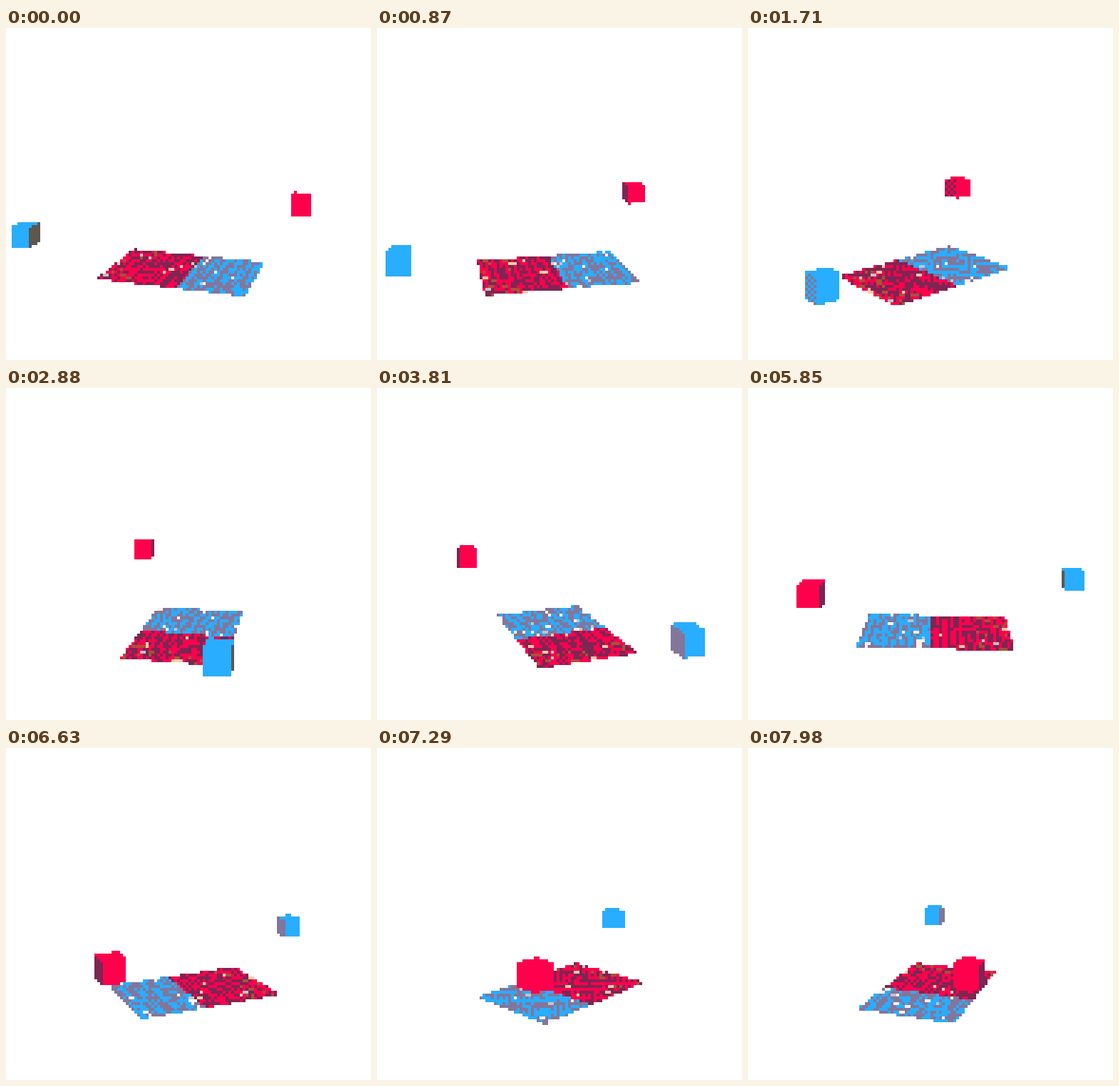
These frames come from a looping animation (512x465 px, 8 s). An HTML page with a canvas:

```html
<!DOCTYPE html>
<html lang="en">
<head>
<meta charset="utf-8">
<title>Orbiting cubes</title>
<style>
  html, body { margin: 0; width: 100%; height: 100%; overflow: hidden; background: #fff; }
  canvas { display: block; width: 512px; height: 468px; image-rendering: pixelated; }
</style>
</head>
<body>
<canvas id="stage" width="128" height="117"></canvas>
<script>
const ctx = document.getElementById('stage').getContext('2d');
const LOOP = 8000, STEP = 30, PX = 4;
const RAD = Math.PI / 180;

// Camera: horizon line, screen centre, distance to the axis, drop to the floor
const HORIZON = 40, CENTRE = 256, DISTANCE = 840, FLOOR = 300;

const RED = '#ff004d', PLUM = '#7e2553', BROWN = '#ab5236';
const BLUE = '#29adff', LAVENDER = '#83769c', SLATE = '#5f574f';
const PEACH = '#ffccaa', SILVER = '#c2c3c7', CREAM = '#fff1e8';

const PLATE = { left: -110, right: 95, half: 66, texel: 5.66 };
const HALF = 14;
const CUBES = [
  { phase: 198.8, radius: 226, drop: 247, ramp: [BLUE, LAVENDER, SLATE] },
  { phase: 35, radius: 177, drop: 220, ramp: [RED, PLUM, PLUM] }
];

function hash(x, y) {
  const s = Math.sin(x * 127.1 + y * 311.7 + 5.3) * 43758.5453;
  return s - Math.floor(s);
}

function plot(px, py, colour) {
  ctx.fillStyle = colour;
  ctx.fillRect(px, py, 1, 1);
}

function project(x, z, drop) {
  const depth = 1 + z / DISTANCE;
  return [(CENTRE + x / depth) / PX, (HORIZON + drop / depth) / PX];
}

function plateColour(x, y, seam) {
  const i = Math.floor(x / PLATE.texel), j = Math.floor(y / PLATE.texel);
  const grain = hash(i, j), flip = hash(j + 40, i) < 0.12 ? 1 : 0;
  const dark = ((i + j) & 1) ^ flip;
  if (x < seam) {
    if (grain < 0.025) return PEACH;
    if (grain < 0.03) return SILVER;
    if (x < -65 && grain > 0.87) return BROWN;
    return dark ? PLUM : RED;
  }
  if (grain < 0.05) return CREAM;
  if (grain < 0.06) return SILVER;
  return dark ? LAVENDER : BLUE;
}

function drawPlate(turn) {
  const c = Math.cos(turn), s = Math.sin(turn), seam = -12 * s;
  for (let py = 74; py < 100; py++) {
    const depth = FLOOR / (py * PX + PX / 2 - HORIZON);
    const z = DISTANCE * (depth - 1);
    for (let px = 28; px < 102; px++) {
      const x = (px * PX + PX / 2 - CENTRE) * depth;
      const along = x * c + z * s, across = z * c - x * s;
      if (along < PLATE.left || along > PLATE.right || Math.abs(across) > PLATE.half) continue;
      plot(px, py, plateColour(along, across, seam));
    }
  }
}

function fillConvex(points, colourAt) {
  const xs = points.map(p => p[0]), ys = points.map(p => p[1]);
  const inside = (x, y) => {
    let sign = 0;
    return points.every((a, i) => {
      const b = points[(i + 1) % points.length];
      const side = (b[0] - a[0]) * (y - a[1]) - (b[1] - a[1]) * (x - a[0]);
      if (!sign) sign = Math.sign(side);
      return side * sign >= 0;
    });
  };
  for (let py = Math.floor(Math.min(...ys)); py <= Math.max(...ys); py++)
    for (let px = Math.floor(Math.min(...xs)); px <= Math.max(...xs); px++)
      if (inside(px + 0.5, py + 0.5)) plot(px, py, colourAt(px, py));
}

// Faces darken as they turn away from the viewer, with a checker between the first two tones
function shade(facing, [light, mid, deep]) {
  if (facing > 0.68) return () => light;
  if (facing > 0.54) return (x, y) => (x + y) & 1 ? mid : light;
  return () => facing > 0.31 ? mid : deep;
}

function drawCube(cube, turn) {
  const { x, z, drop, ramp } = cube;
  const corner = (k, rise) => {
    const a = turn + (k * 90 + 45) * RAD, r = HALF * Math.SQRT2;
    return project(x + r * Math.cos(a), z + r * Math.sin(a), drop - rise);
  };
  for (let k = 0; k < 4; k++) {
    const n = turn + k * 90 * RAD, nx = Math.cos(n), nz = Math.sin(n);
    if (-x * nx - (DISTANCE + z) * nz <= HALF) continue;
    fillConvex([corner(k - 1, HALF), corner(k, HALF), corner(k, -HALF), corner(k - 1, -HALF)],
      shade(-nz, ramp));
  }
  fillConvex([0, 1, 2, 3].map(k => corner(k, HALF)), () => ramp[0]);
}

function draw() {
  const time = Math.floor(performance.now() % LOOP / STEP) * STEP;
  const turn = (-17 + time * 0.0334) * RAD;
  ctx.fillStyle = '#fff';
  ctx.fillRect(0, 0, 128, 117);
  drawPlate(turn);
  CUBES.map(cube => {
    const a = turn + cube.phase * RAD;
    return { ...cube, x: cube.radius * Math.cos(a), z: cube.radius * Math.sin(a) };
  }).sort((a, b) => b.z - a.z).forEach(cube => drawCube(cube, turn));
  requestAnimationFrame(draw);
}
draw();
</script>
</body>
</html>
```
